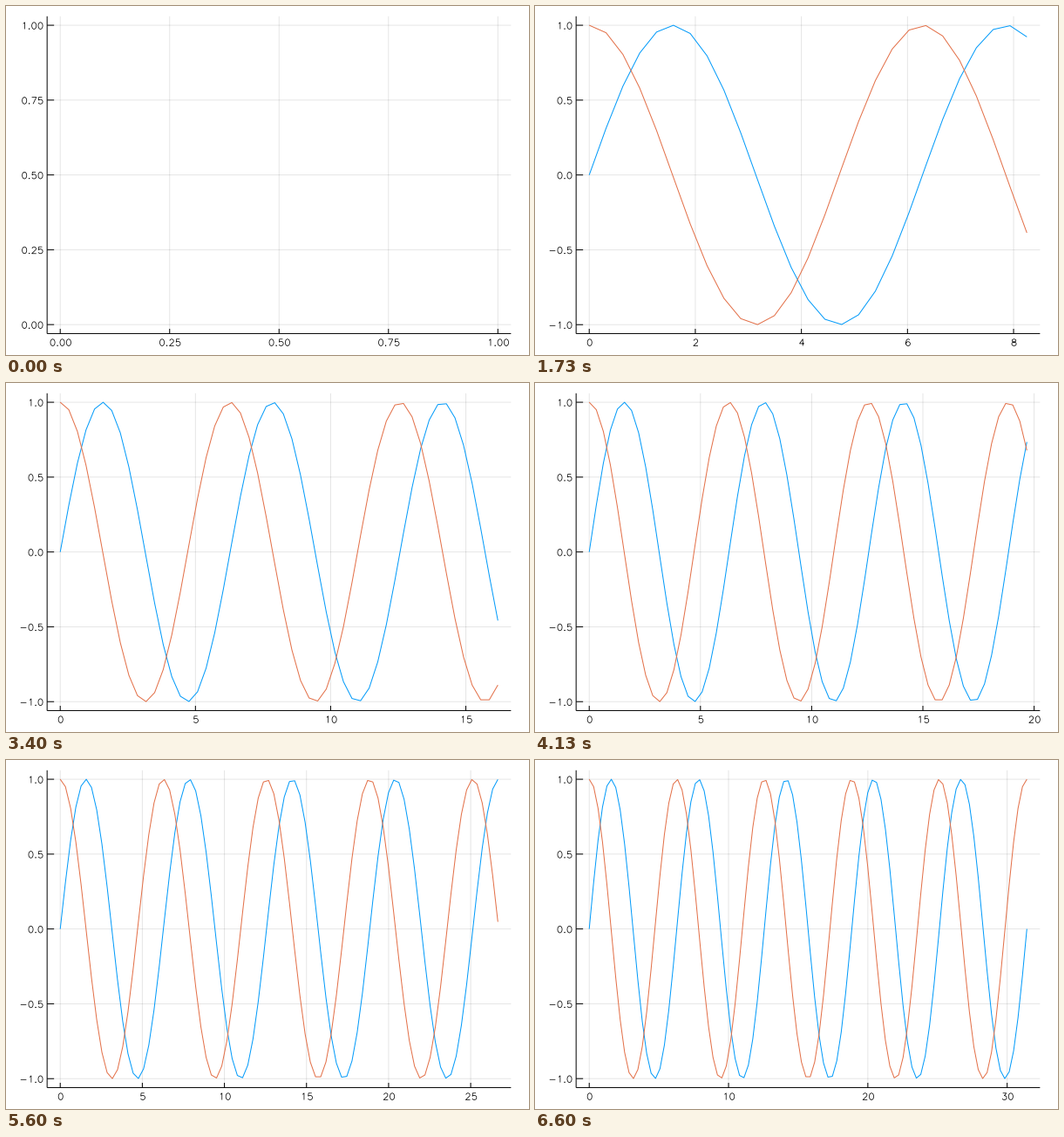
Animation of 600x400 px, one loop 6670 ms. Source, as a matplotlib script:

```python
import numpy as np
import matplotlib.pyplot as plt
from matplotlib.animation import FuncAnimation
from matplotlib.collections import LineCollection

W, H, DPI = 600, 400, 100
PX = 72 / DPI
POINTS, FPS = 100, 15
LOOP, TICK = 6670, 23  # ms; TICK divides LOOP
LEFT, RIGHT, TOP, BOTTOM = 47.16, 579.35, 11.78, 375.44
BLUE, ORANGE = "#009afa", "#e36f47"

X = np.linspace(0, 10 * np.pi, POINTS)
SIN, COS = np.sin(X), np.cos(X)

# Tick steps with their niceness, largest first
NICE = {1: 1.0, 5: 0.9, 2: 0.7, 2.5: 0.5, 3: 0.2}
STEPS = sorted(((q * 10.0**z, w) for z in (-2, -1, 0, 1) for q, w in NICE.items()),
               reverse=True)


def arc(cx, cy, rx, ry, start, end):
    a = np.radians(np.linspace(start, end, 25))
    return list(zip(cx + rx * np.cos(a), cy + ry * np.sin(a)))


# Single-stroke numerals, 21 units tall
SIX = arc(11, 10.5, 7, 10.5, 50, 180) + arc(10.5, 6.5, 6.5, 6.5, 180, -180)
GLYPHS = {
    "0": arc(10, 10.5, 7, 10.5, 0, 360),
    "1": [(6, 17), (8, 18), (11, 21), (11, 0)],
    "2": arc(10, 15, 6, 6, 170, -30) + [(3, 0), (17, 0)],
    "3": [(5, 21), (16, 21), (10, 13)] + arc(10, 6.5, 7, 6.5, 90, -155),
    "4": [(13, 0), (13, 21), (3, 7), (18, 7)],
    "5": [(15, 21), (5, 21), (4, 12)] + arc(10, 7, 7, 7, 135, -155),
    "6": SIX,
    "7": [(3, 21), (17, 21), (7, 0)],
    "8": arc(10, 16.5, 6, 4.5, -90, 270) + arc(10, 6, 7, 6, 90, -270),
    "9": [(20 - x, 21 - y) for x, y in SIX],
    ".": [(5, 2), (4, 1), (5, 0), (6, 1), (5, 2)],
    "-": [(4, 9), (22, 9)],
}
ADVANCE = {".": 10, "-": 26}
SCALE = 0.367


def write(text, x, baseline, align):
    """Strokes of a label; align is the share of its width left of x."""
    widths = [ADVANCE.get(c, 20) * SCALE for c in text]
    x -= align * sum(widths)
    strokes = []
    for char, width in zip(text, widths):
        strokes.append(np.array(GLYPHS[char]) * (SCALE, -SCALE) + (x, baseline))
        x += width
    return strokes


def limits(lo, hi):
    if hi <= lo:
        hi = lo + 1
    pad = 0.03 * (hi - lo)
    return lo - pad, hi + pad


def find_ticks(lo, hi):
    """Best-scoring set of 4 to 8 round values, with their labels."""
    best, chosen = -1, None
    for step, nice in STEPS:
        first, last = int(np.ceil(lo / step)), int(np.floor(hi / step))
        n = last - first + 1
        if not 4 <= n <= 8:
            continue
        granularity = 1 - abs(n - 5) / 5
        coverage = 1.5 * (hi - lo) / ((n - 1) * step)
        score = granularity / 4 + coverage / 3 + nice / 4
        if score > best + 1e-9:
            best, chosen = score, (step, first, last)
    step, first, last = chosen
    digits = len(f"{step:.6g}".partition(".")[2])
    return [(k * step, f"{k * step:.{digits}f}") for k in range(first, last + 1)]


fig = plt.figure(figsize=(W / DPI, H / DPI), dpi=DPI, facecolor="white")
ax = fig.add_axes([0, 0, 1, 1])
ax.set(xlim=(0, W), ylim=(H, 0))
ax.axis("off")


def strokes(color, zorder, width=1):
    lines = LineCollection([], colors=[color], linewidths=width * PX, zorder=zorder,
                           joinstyle="round", snap=False)
    ax.add_collection(lines, autolim=False)
    return lines


grid = strokes((0, 0, 0, 0.1), 1)
frame = strokes("black", 3)
labels = strokes("black", 4, 0.75)
curves = [ax.plot([], [], color=c, lw=PX, zorder=2, solid_joinstyle="round",
                  solid_capstyle="butt", snap=False)[0] for c in (BLUE, ORANGE)]
artists = [grid, frame, labels, *curves]


def draw(i):
    n = i + 1
    ys = np.array([SIN[:n], COS[:n]])
    x0, x1 = limits(0, X[i])
    y0, y1 = limits(ys.min(), ys.max())

    def px(x):
        return LEFT + (x - x0) / (x1 - x0) * (RIGHT - LEFT)

    def py(y):
        return BOTTOM - (y - y0) / (y1 - y0) * (BOTTOM - TOP)

    tick_w, tick_h = 0.015 * (RIGHT - LEFT), 0.015 * (BOTTOM - TOP)
    grid_lines, text = [], []
    axis_lines = [[(LEFT, TOP), (LEFT, BOTTOM)], [(LEFT, BOTTOM), (RIGHT, BOTTOM)]]
    for value, label in find_ticks(x0, x1):
        x = px(value)
        grid_lines.append([(x, TOP), (x, BOTTOM)])
        axis_lines.append([(x, BOTTOM), (x, BOTTOM - tick_h)])
        text += write(label, x + 0.5, 389.5, 0.5)
    for value, label in find_ticks(y0, y1):
        y = py(value)
        grid_lines.append([(LEFT, y), (RIGHT, y)])
        axis_lines.append([(LEFT, y), (LEFT + tick_w, y)])
        text += write(label, 43.2, y + 4.4, 1)

    grid.set_segments(grid_lines)
    frame.set_segments(axis_lines)
    labels.set_segments(text)
    for curve, y in zip(curves, ys):
        curve.set_data(px(X[:n]), py(y))


def update(k):
    # Plot steps run at FPS, with start times rounded to 10 ms
    end = (k + 1) * TICK + 5
    draw(min(end * FPS // 1000, POINTS - 1))
    return artists


anim = FuncAnimation(fig, update, frames=LOOP // TICK, interval=TICK,
                     repeat=True, repeat_delay=0, blit=False)
plt.show()
```
